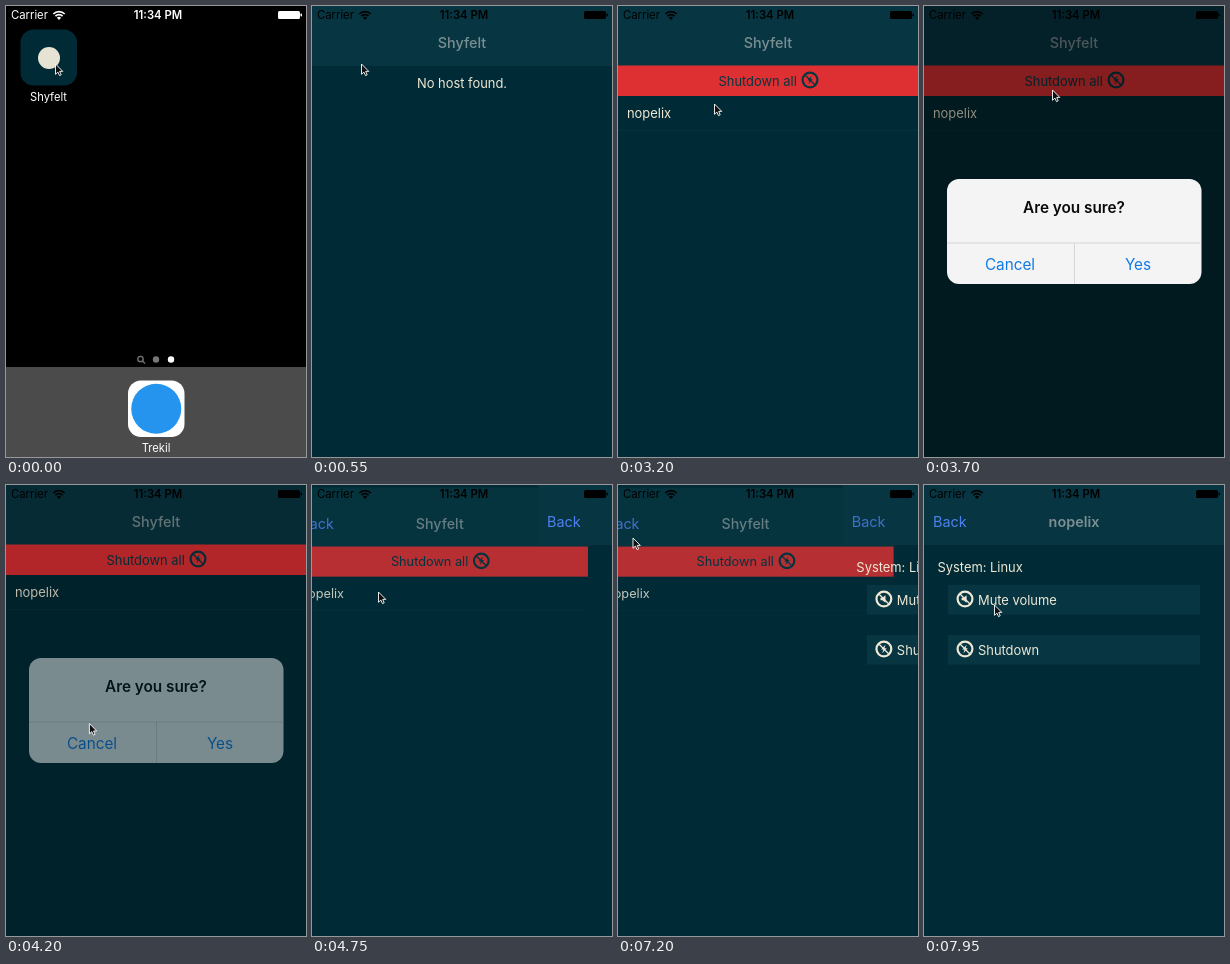
Animation, 300 px wide and 451 px high, one loop 8 s. Source, as an HTML page:

```html
<!DOCTYPE html>
<html lang="en">
<head>
<meta charset="utf-8">
<title>Remote host control</title>
<style>
html, body { margin: 0; width: 100%; height: 100%; overflow: hidden; background: #000; }
svg { display: block; width: 300px; height: 451px; }
text { font: 12.9px Inter, "Open Sans", sans-serif; fill: #eee8d5; }
.mid { text-anchor: middle; }
.title { font-size: 14.4px; font-weight: 500; fill: #7b8f93; }
.back { font-size: 14.4px; fill: #4d82ee; }
.label { font-size: 11.2px; fill: #fff; }
.dark { fill: #073642; }
.bar { fill: #073642; }
#status text { font-size: 11.3px; fill: inherit; }
#alert text { font-size: 15.3px; fill: #127ae6; }
#alert .ask { font-weight: 600; fill: #0a0a0a; }
</style>
</head>
<body>
<svg viewBox="0 0 300 451">
  <defs>
    <g id="ring" fill="none">
      <circle r="7.4" stroke-width="2.2"/>
      <path d="M-5 -5L5 5" stroke-width="1.3"/>
    </g>
    <g id="flash">
      <use href="#ring"/>
      <path d="M1.600 -4.300L-2.800 .6H-.5L-1.600 4.300L2.800 -.8H.6Z" stroke="none"/>
    </g>
    <g id="mute">
      <use href="#ring"/>
      <path d="M-3.400 -1.300H-1.600L1.600 -3.700V3.700L-1.600 1.300H-3.400Z" stroke="none"/>
    </g>
  </defs>

  <rect width="300" height="451"/>
  <g id="home">
    <rect x="14.500" y="23.500" width="56.500" height="56" rx="13" fill="#002b36"/>
    <circle cx="43" cy="52" r="11" fill="#e6e2d4"/>
    <text class="label mid" x="42.5" y="95">Shyfelt</text>
    <g fill="none" stroke="#777" stroke-width="1.3">
      <circle cx="134.5" cy="353" r="2.7"/><path d="M136.5 355L139 357.5"/>
    </g>
    <circle cx="150" cy="353.500" r="3.2" fill="#777"/>
    <circle cx="165" cy="353.500" r="3.2" fill="#fff"/>
    <rect y="361" width="300" height="90" fill="#4b4b4b"/>
    <rect x="122" y="374.500" width="56.500" height="56.500" rx="13" fill="#fff"/>
    <circle cx="150.250" cy="402.750" r="25" fill="#2494ee"/>
    <text class="label mid" x="150" y="446">Trekil</text>
  </g>

  <rect id="splash" fill="#002b36"/>
  <g id="app">
    <rect width="300" height="451" fill="#002b36"/>
    <g id="list">
      <rect class="bar" width="300" height="60"/>
      <text class="back" id="listBack" x="9" y="42">Back</text>
      <text class="title mid" x="150" y="42">Shyfelt</text>
      <text class="mid" id="empty" x="150" y="82">No host found.</text>
      <g id="hosts">
        <rect y="59.500" width="300" height="30.500" fill="#de3033"/>
        <text class="dark" x="100.500" y="79.500">Shutdown all</text>
        <use href="#flash" x="192" y="74" fill="#073642" stroke="#073642"/>
        <text x="9" y="112">nopelix</text>
        <rect class="bar" y="124" width="300" height=".5"/>
      </g>
    </g>
    <g id="detail">
      <rect class="bar" width="300" height="60"/>
      <text class="back" id="detailBack" x="9" y="42">Back</text>
      <text class="title mid" x="150" y="42" style="font-weight:600">nopelix</text>
      <g id="info">
        <text x="13.500" y="87">System: Linux</text>
        <rect class="bar" x="24" y="100" width="252" height="29.500"/>
        <use href="#mute" x="41" y="114" fill="#eee8d5" stroke="#eee8d5"/>
        <text x="54" y="119.500">Mute volume</text>
        <rect class="bar" x="24" y="150" width="252" height="29.500"/>
        <use href="#flash" x="41" y="164" fill="#eee8d5" stroke="#eee8d5"/>
        <text x="54" y="169.500">Shutdown</text>
      </g>
    </g>
  </g>

  <g id="status">
    <text x="5" y="13">Carrier</text>
    <path d="M47.300 8A8 8 0 0 1 58.700 8M49.400 10.200A5 5 0 0 1 56.600 10.200" class="line" fill="none" stroke-width="1.7"/>
    <path d="M53 14L50.900 11.700A3 3 0 0 1 55.100 11.700Z"/>
    <text class="mid" x="152" y="13" style="font-weight:600">11:34 PM</text>
    <rect x="272" y="5" width="22" height="8" rx="1.500"/>
    <rect x="294.500" y="7.500" width="1.500" height="3" rx=".7"/>
  </g>

  <rect id="dim" width="300" height="451"/>
  <g id="alert">
    <rect x="23" y="173" width="254.500" height="105" rx="12" fill="#f4f4f4"/>
    <path d="M23 237H277.500M150.500 237V278" stroke="#d2d2d4" stroke-width=".9"/>
    <text class="ask mid" x="150" y="206.500">Are you sure?</text>
    <text class="mid" x="86" y="263.500">Cancel</text>
    <text class="mid" x="214" y="263.500">Yes</text>
  </g>

  <path id="cursor" d="M.5 0V10.300L2.900 8.100L4.500 11.600L6.200 10.800L4.700 7.400H7.800Z"
        fill="#111" stroke="#fff" stroke-width=".9" stroke-linejoin="round"/>
</svg>
<script>
const LOOP = 8000, STEP = 50;
const LAUNCH = 100, LAUNCHED = 500, FOUND = 1800;
const PUSH = 4690, LOADED = 5250, POP = 7017, REPUSH = 7400, RELOADED = 7800;

// time, x, y of the pointer tip
const PATH = [
  [0, 49, 58], [850, 49, 58], [900, 121, 33], [1150, 121, 33],
  [1550, 140, 178], [1700, 140, 178], [2550, 108, 119], [2750, 98, 100],
  [2950, 98, 100], [3000, 96, 98], [3200, 96, 98], [3400, 128, 84],
  [3700, 128, 84], [4000, 85, 255], [4150, 85, 255], [4600, 66, 107],
  [5200, 66, 107], [5600, 72, 140], [6050, 72, 140], [6350, 90, 210],
  [6900, 18, 40], [7050, 18, 40], [7200, 14.5, 53], [7350, 62, 112],
  [7700, 66, 115], [7950, 70, 120]
];

const $ = id => document.getElementById(id);
const clamp = v => Math.max(0, Math.min(1, v));
const lerp = (a, b, k) => a + (b - a) * k;
const easeOut = k => 1 - (1 - k) ** 3;
const set = (id, attrs) => {
  for (const name in attrs) $(id).setAttribute(name, attrs[name]);
};
const show = (id, on) => { $(id).style.display = on ? "" : "none"; };

// nearly critical spring with a small starting speed
function spring(ms) {
  if (ms <= 0) return 0;
  const s = ms / 1000, w = 14.1;
  const p = 1 - (1 + (w - 1.5) * s) * Math.exp(-w * s);
  return p > 0.99 ? 1 : p;
}

function pointer(t) {
  const i = PATH.findIndex(k => k[0] > t);
  if (i < 0) return PATH[PATH.length - 1].slice(1);
  const [a, b] = [PATH[i - 1], PATH[i]];
  const k = (t - a[0]) / (b[0] - a[0]);
  return [lerp(a[1], b[1], k), lerp(a[2], b[2], k)];
}

function depth(t) {
  if (t >= REPUSH) return spring(t - REPUSH);
  if (t >= POP) return 1 - spring(t - POP);
  return spring(t - PUSH);
}

function drawLaunch(t) {
  const k = easeOut(clamp((t - LAUNCH) / (LAUNCHED - LAUNCH)));
  const zoom = 1 + 4 * k;
  const open = t >= LAUNCHED;
  show("home", !open);
  show("splash", !open && k > 0);
  show("app", open);
  set("home", {
    transform: `translate(43 51) scale(${zoom}) translate(-43 -51)`,
    opacity: t < STEP ? 1 : t < LAUNCH ? 0.75 : 1 - k
  });
  set("splash", {
    x: lerp(14, 0, k), y: lerp(23, 0, k),
    width: lerp(57, 300, k), height: lerp(57, 451, k), rx: lerp(13, 0, k)
  });
  const ink = open ? "#000" : "#fff";
  set("status", { fill: ink });
  $("status").querySelector(".line").setAttribute("stroke", ink);
}

function drawScenes(t) {
  const p = depth(t);
  show("empty", t < FOUND);
  show("hosts", t >= FOUND);
  show("list", p < 1);
  show("listBack", p > 0);
  show("detail", p > 0);
  show("info", t >= RELOADED || (t >= LOADED && t < REPUSH));
  set("list", {
    transform: `translate(${150 - 90 * p} 225.5) scale(${1 - 0.05 * p}) translate(-150 -225.5)`,
    opacity: 1 - 0.7 * p
  });
  set("detail", { transform: `translate(${300 * (1 - p)} 0)` });
  set("detailBack", { opacity: t >= POP && t < REPUSH ? 0.78 : 1 });
}

function drawAlert(t) {
  const enter = easeOut(clamp((t - 3500) / 200));
  const fade = enter * (1 - clamp((t - 4050) / 300));
  const size = 1.15 - 0.15 * enter;
  set("dim", { opacity: 0.4 * fade });
  set("alert", {
    opacity: fade,
    transform: `translate(150 225.5) scale(${size}) translate(-150 -225.5)`
  });
}

function draw(t) {
  drawLaunch(t);
  drawScenes(t);
  drawAlert(t);
  set("cursor", { transform: `translate(${pointer(t).join(" ")})` });
}

const start = performance.now();
function tick() {
  const t = (performance.now() - start) % LOOP;
  draw(Math.floor(t / STEP) * STEP);
  requestAnimationFrame(tick);
}
tick();
</script>
</body>
</html>
```
